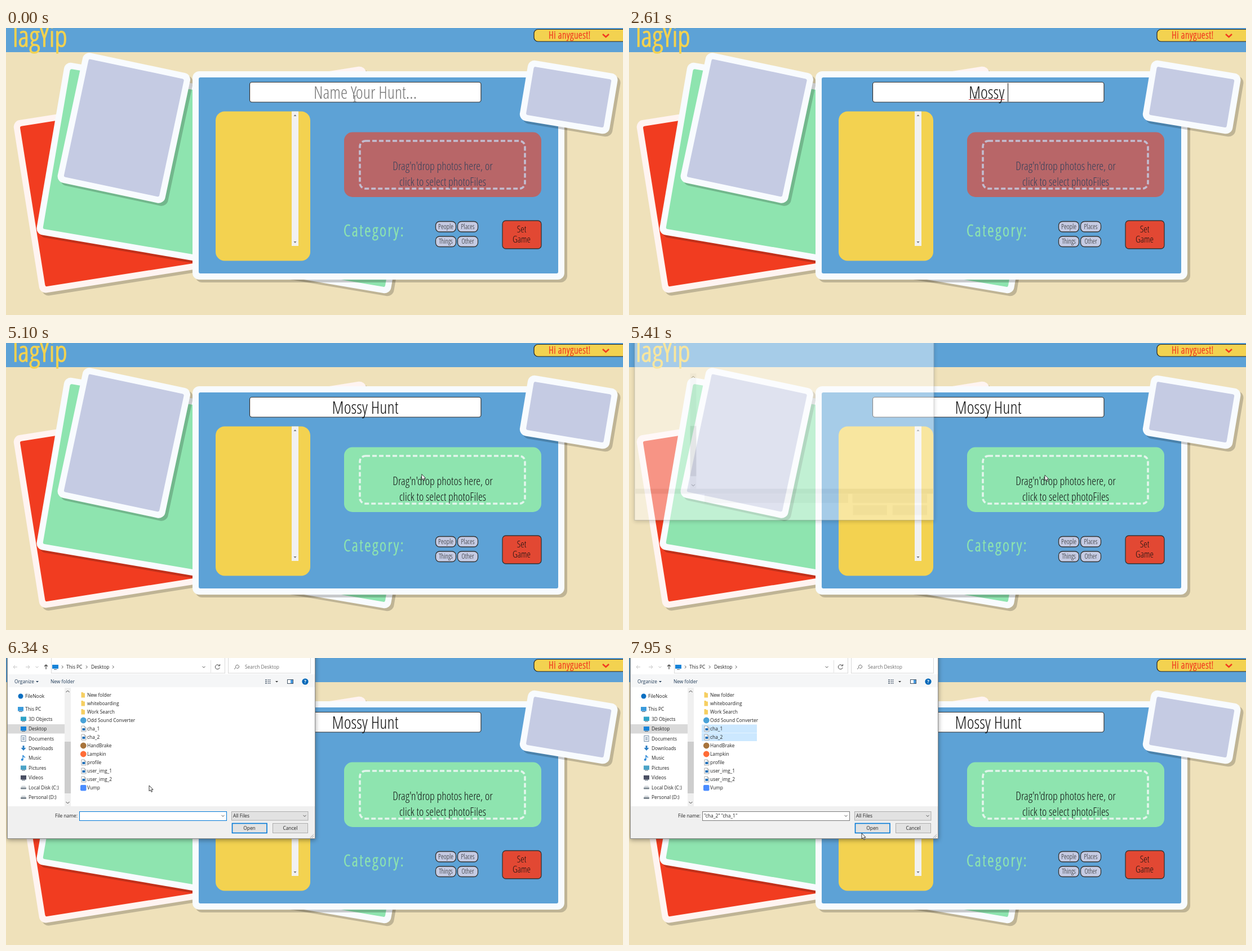
Recreate the animation shown at these times as an HTML page. Size 1095x511 px, loop 8 s.

```html
<!DOCTYPE html>
<html lang="en">
<head>
<meta charset="utf-8">
<title>Photo hunt setup</title>
<style>
  html, body { margin: 0; width: 100%; height: 100%; overflow: hidden; background: #efe1ba; }
  svg { display: block; width: 1095px; height: 511px; }
  text { white-space: pre; }
  .hand { font-family: "Open Sans Condensed Light", "Open Sans", "Noto Sans", sans-serif; font-stretch: 75%; font-weight: 300; }
  .ui { font-family: "Open Sans", "Noto Sans", sans-serif; font-size: 8.4px; }
</style>
</head>
<body>
<svg id="stage" viewBox="0 0 1095 511"></svg>
<script>
const LOOP = 8000, STEP = 77;
const BLUE = '#5da2d6', YELLOW = '#f3d250', GREEN = '#8ee4af', RED = '#f13c20', LILAC = '#c5cbe3';

const rect = (x, y, w, h, fill, rx = 0, more = '') =>
  `<rect x="${x}" y="${y}" width="${w}" height="${h}" rx="${rx}" fill="${fill}" ${more}/>`;
const path = (d, color, width = 1, more = '') =>
  `<path d="${d}" fill="none" stroke="${color}" stroke-width="${width}" ${more}/>`;
const shape = (d, fill) => `<path d="${d}" fill="${fill}"/>`;
const dot = (x, y, r, fill) => `<circle cx="${x}" cy="${y}" r="${r}" fill="${fill}"/>`;
const hand = (x, y, size, str, fill, more = '') =>
  `<text class="hand" x="${x}" y="${y}" font-size="${size}" fill="${fill}" ${more}>${str}</text>`;
const ui = (x, y, str, fill = '#222', more = '') =>
  `<text class="ui" x="${x}" y="${y + 3}" fill="${fill}" ${more}>${str}</text>`;
const middle = 'text-anchor="middle"';
const stroke = (color, width = 1) => `stroke="${color}" stroke-width="${width}"`;
// Thickens the light lettering a little
const marker = color => stroke(color, .5);

// White-framed card with an offset shadow, turned about its top left corner
function card(x, y, w, h, angle, fill, frame = '#f8fbfe') {
  const turn = shift => `transform="translate(${x + shift} ${y + shift}) rotate(${angle})"`;
  return rect(0, 0, w, h, '#0003', 12, turn(5)) +
    `<g ${turn(0)}>${rect(0, 0, w, h, frame, 12)}${rect(11, 11, w - 22, h - 22, fill, 3)}</g>`;
}

function page() {
  const tags = ['People', 'Places', 'Things', 'Other'].map((name, i) => {
    const x = 762.5 + i % 2 * 39, y = 344.5 + (i >> 1) * 26.5;
    return rect(x, y, 36, 18.5, LILAC, 7, stroke('#333', 1.3)) +
      hand(x + 18, y + 13, 12, name, '#222', middle);
  }).join('');
  return rect(0, 0, 1095, 511, '#efe1ba') + rect(0, 0, 1095, 43, BLUE) +
    hand(8, 33, 51, 'TagYip', YELLOW, stroke(YELLOW, 1.5)) +
    rect(937, 2.5, 165, 21.5, YELLOW, 7, stroke('#222', 1.2)) +
    hand(963, 19, 17.5, 'Hi anyguest!', RED, 'letter-spacing=".5" ' + marker(RED)) +
    path('M1059 11l5.500 5 5.500-5', RED, 2.6) +
    card(12, 166, 633, 311, -9, RED, '#fff4f1') +
    card(105, 60, 638, 311, 9.7, GREEN) +
    card(138.5, 42, 195, 236.5, 12, LILAC) +
    card(331, 77, 660, 371, 0, BLUE) +
    card(928, 56, 161.5, 109, 9.5, LILAC) +
    rect(432.5, 96.5, 410.5, 35.5, '#fff', 4, stroke('#333', 1.2)) +
    rect(372, 148.5, 168, 266, YELLOW, 16) + rect(507, 148.5, 12, 239.5, '#f1f1f1') +
    shape('M510.500 157l2.500-3 2.500 3zM510.500 380l2.500 3 2.500-3z', '#777') +
    `<g id="drop">${rect(600, 185.5, 350, 115.5, 'currentColor', 15)}
      ${rect(628, 201, 293, 85, 'none', 10, 'id="dashes" stroke-width="3.6" stroke-dasharray="8 4"')}
      <g id="dropText">${hand(775, 253, 20, "Drag'n'drop photos here, or", 'inherit', middle)}
      ${hand(775, 281, 20, 'click to select photoFiles', 'inherit', middle)}</g></g>` +
    hand(599, 371, 29, 'Category:', GREEN, 'letter-spacing="2.500" ' + stroke(GREEN, .8)) + tags +
    rect(881, 343, 69, 50, '#e24833', 6, stroke('#333', 1.3)) +
    hand(915, 364, 16.5, 'Set', '#111', middle) +
    hand(915, 382, 16.5, 'Game', '#111', middle) +
    hand(637.5, 126, 31, '', '#111', middle + ' id="title"') +
    path('', '#c33', 1, 'id="spell"') + rect(0, 98, 1, 33, '#111', 0, 'id="caret"');
}

const SIDE = [['FileNook', 68, '#0a6fc2'], ['This PC', 91, '#3b9bdc'], ['3D Objects', 108.5, '#2fa3c7'],
  ['Desktop', 126, '#1683d8'], ['Documents', 143.5, '#6d8aa5'], ['Downloads', 161, '#2c7fc4'],
  ['Music', 178, '#2c8ad8'], ['Pictures', 195.5, '#4ba3c7'], ['Videos', 213, '#4a4f63'],
  ['Local Disk (C:)', 230.5, '#7d8790'], ['Personal (D:)', 248, '#7d8790']];
const FILES = ['New folder', 'whiteboarding', 'Work Search', 'Odd Sound Converter', 'cha_1', 'cha_2',
  'HandBrake', 'Lampkin', 'profile', 'user_img_1', 'user_img_2', 'Vump'];
const APPS = { 3: '#4aa3d8', 6: '#a8743c', 7: '#ff6c37', 11: '#4a8cff' };

function sideIcon(i, x, y, color) {
  if (i === 0) return dot(x, y, 4.5, color);
  if (i === 4) return rect(x - 4, y - 5, 8, 10, '#fff', 0, stroke(color)) + path(`M${x - 2} ${y - 2}h4m-4 2h4m-4 2h4`, color);
  if (i === 5) return shape(`M${x - 1.5} ${y - 5}h3v4h3l-4.500 5-4.500-5h3z`, color);
  if (i === 6) return path(`M${x - 1} ${y + 3}v-8q1 3 4 4`, color, 1.4) + dot(x - 2.3, y + 3, 2, color);
  if (i > 8) return rect(x - 5, y, 10, 3, color, 1) + shape(`M${x - 3} ${y - 3}h6l2 3h-10z`, '#d4d9dd');
  return rect(x - 5, y - 4, 10, 7.5, color) + path(`M${x - 3} ${y + 4.5}h6`, '#567', 1);
}

const sheet = (y, inner) => shape(`M134 ${y - 5}h5l3 3v7h-8z`, '#fff') +
  path(`M134 ${y - 5}h5l3 3v7h-8zM139 ${y - 5}v3h3`, '#999', .8) + inner;

function fileRow(name, i) {
  const y = 66 + 15 * i;
  let icon;
  if (i < 3) icon = shape(`M133.500 ${y - 5}h3l1 1.500h2.500v8h-6.500z`, '#f6cf62');
  else {
    const loaded = !APPS[i] ? sheet(y, rect(135.5, y - 1, 5, 4, '#1f6fb8')) :
      i === 11 ? rect(132, y - 5, 10.5, 10.5, APPS[i], 2) : dot(137.3, y, 5.4, APPS[i]);
    icon = `<g class="blank">${sheet(y, '')}</g><g class="loaded">${loaded}</g>`;
  }
  return icon + ui(144, y, name);
}

function dialog() {
  const down = (x, y, c = '#555') => path(`M${x - 2.5} ${y - 1.2}l2.500 2.500 2.500-2.500`, c);
  const next = (x, y) => path(`M${x - 1} ${y - 2.5}l2.300 2.500-2.300 2.500`, '#555');
  const button = (x, y, w, h, edge, width) => rect(x, y, w, h, '#e2e2e2', 0, stroke(edge, width));
  const frame = rect(2.5, -120, 546, 441.5, '#fff', 0, stroke('#8a8a8a') + ' filter="url(#soft)"') +
    rect(3, 264, 545, 9, '#e6e6e6') + rect(130, 273, 262, 17, '#f0f0f0') + rect(400, 273, 136, 17, '#f0f0f0') +
    rect(401, 294, 62, 18, '#f0f0f0') + rect(473, 294, 63, 18, '#f0f0f0') +
    rect(104, 53, 11, 211, '#f0f0f0') + rect(104, 149, 11, 92, '#cdcdcd') +
    path('M106.500 61l3-3 3 3M106.500 256l3 3 3-3', '#444');
  const panels = rect(3, 29, 545, 23, '#f5f6f7') + rect(3, 264, 545, 57, '#f0f0f0') +
    rect(130.5, 273.5, 261, 16, '#fff', 0, 'id="field"') +
    button(400.5, 273.5, 135.5, 15.5, '#adadad') +
    button(401.5, 294.5, 61.5, 17, '#0078d7', 1.6) +
    button(473.5, 294.5, 62, 17, '#adadad');
  const nav = rect(80.5, -5, 308, 32, '#fff', 0, stroke('#d9d9d9')) + path('M363.500 4v22', '#e0e0e0') +
    rect(394.5, -5, 146, 32, '#fff', 0, stroke('#d9d9d9')) +
    path('M20 16h-7m3-3l-3 3 3 3M35 16h7m-3-3l3 3-3 3', '#c4c4c4') + down(55, 16, '#bbb') +
    path('M71 20v-8m-3 3l3-3 3 3', '#444', 1.2) + rect(82, 12, 11, 7, '#1683d8') + path('M85 20.500h5', '#567') +
    next(100, 16) + ui(107, 16, 'This PC') + next(143, 16) + ui(151, 16, 'Desktop') +
    `<g class="loaded">${next(190, 16)}</g>` + down(351, 16) +
    path('M378.500 13.500a4 4 0 1 0 .7 3.500M379.500 11v3h-3', '#444') +
    path('M405 20l3-3a3 3 0 1 1 1 1', '#666') + ui(424, 16, 'Search Desktop', '#6d6d6d') +
    ui(15, 42, 'Organize', '#1e3956') + shape('M53 41h5l-2.500 2.500z', '#1e3956') + ui(79, 42, 'New folder', '#1e3956') +
    path('M460 39h3m1.500 0h2m1 0h2m-9.500 3h3m1.500 0h2m1 0h2m-9.500 3h3m1.500 0h2m1 0h2', '#567', 1.6) +
    shape('M478 41h5l-2.500 2.500z', '#333') + rect(499.5, 38.5, 10, 7, '#fff', 0, stroke('#456')) +
    rect(505, 39, 4, 6, '#4a9be0') + dot(531, 42, 5.6, '#0067b8') +
    ui(531, 42, '?', '#fff', middle + ' font-weight="700"');
  const side = rect(3, 118, 101, 16.5, '#d9d9d9') + SIDE.map(([name, y, color], i) =>
    sideIcon(i, i < 2 ? 26 : 31, y, color) + ui(i < 2 ? 34 : 40, y, name)).join('');
  const rows = [0, 1].map(i => rect(129, 118.5 + 15 * i, 98, 14.5, 'none', 0, 'class="row"')).join('');
  const foot = ui(127, 281, 'File name:', '#222', 'text-anchor="end"') + ui(133, 281, '', '#222', 'id="fileName"') +
    path('M134 275.500v11', '#111', 1, 'id="fileCaret"') + down(385, 281) + ui(403, 281, 'All Files') + down(530, 281) +
    ui(432, 303, 'Open', '#222', middle) + ui(504.5, 303, 'Cancel', '#222', middle) +
    path('M540 320l6-6m-3 6l3-3', '#aaa', 1.2, 'stroke-dasharray="1.500 1"');
  return `<g id="dialog">${frame}<g id="content">${panels}${nav}${side}${rows}${FILES.map(fileRow).join('')}${foot}</g></g>`;
}

const arrow = '<path id="arrow" d="M0 0v10l2.300-2 1.700 3.600 1.700-.8-1.700-3.500h3.100z" fill="#fff" stroke="#222" stroke-width=".9"/>';
const beam = path('M-2.500-5.500q2.500 0 2.500 1v9q0 1-2.500 1M2.500-5.500q-2.500 0-2.500 1M0 4.500q0 1 2.500 1', '#444', .9, 'id="beam"');

const stage = document.getElementById('stage');
stage.innerHTML = `<defs><filter id="soft" x="-10%" y="-10%" width="120%" height="120%">
  <feDropShadow dx="0" dy="2" stdDeviation="4" flood-opacity=".4"/></filter></defs>` +
  page() + dialog() + `<g id="mouse">${arrow}${beam}</g>`;

const $ = id => document.getElementById(id);
const show = (el, on) => el.setAttribute('display', on ? 'inline' : 'none');
const set = (el, attrs) => { for (const k in attrs) el.setAttribute(k, attrs[k]); };

// start, number of steps, end point
const MOVES = [[210, 5, 616, 120], [4490, 1, 680, 158], [4567, 3, 737, 228], [4870, 5, 738, 235],
  [5480, 2, 654, 189], [5790, 8, 254, 227], [6410, 3, 160, 122], [6650, 1, 167, 126],
  [6950, 3, 206, 146], [7410, 8, 413, 312]];
const WORDS = 'Mossy Hunt';
const KEYS = [1360, 1680, 1990, 2060, 2230, 2610, 3010, 3240, 3390, 3540];
const CLICK = 420, BLUR = 4950, OPEN = 5410, LOADED = 5790, FIRST = 6800, SECOND = 7110;

function mouseAt(t) {
  let x = 619, y = 126;
  for (const [start, steps, toX, toY] of MOVES) {
    const k = Math.min(steps, Math.max(0, Math.floor((t - start) / STEP) + 1)) / steps;
    x += (toX - x) * k;
    y += (toY - y) * k;
  }
  return [x, y];
}

function drawTitle(t) {
  const title = $('title'), count = KEYS.filter(k => k <= t).length;
  const typing = t >= CLICK;
  title.textContent = typing ? WORDS.slice(0, count) : 'Name Your Hunt...';
  title.setAttribute('fill', typing ? '#111' : '#757575');
  const width = title.getComputedTextLength(), left = 637.5 - width / 2;
  const since = t - (count ? KEYS[count - 1] : CLICK);
  $('caret').setAttribute('x', left + width);
  show($('caret'), typing && t < BLUR && since % 960 < 480);
  show($('spell'), count > 5 && t < BLUR);
  if (count > 5) $('spell').setAttribute('d', `M${left} 127.500h${title.getSubStringLength(0, 5)}`);
}

function drawDialog(t, x, y) {
  show($('dialog'), t >= OPEN);
  const phase = Math.min(3, Math.max(0, Math.floor((t - OPEN) / 75)));
  const scale = [.973, .988, .996, 1][phase];
  set($('dialog'), { opacity: [.45, .75, .92, 1][phase],
    transform: `translate(275 100) scale(${scale}) translate(-275 -100)` });
  show($('content'), phase > 0);
  document.querySelectorAll('.loaded').forEach(el => show(el, t >= LOADED));
  document.querySelectorAll('.blank').forEach(el => show(el, t < LOADED));
  const picked = [t >= FIRST, t >= SECOND];
  document.querySelectorAll('.row').forEach((row, i) => {
    const over = x > 129 && x < 227 && y >= 118.5 + 15 * i && y < 133.5 + 15 * i;
    row.setAttribute('fill', picked[i] ? '#cce8ff' : over ? '#e5f3ff' : 'none');
  });
  $('fileName').textContent = picked[1] ? '"cha_2" "cha_1"' : picked[0] ? 'cha_1' : '';
  set($('field'), { stroke: picked[0] ? '#7a7a7a' : '#0078d7' });
  show($('fileCaret'), t < FIRST && (t - 5480) % 960 < 480);
}

function draw(t) {
  const [x, y] = mouseAt(t), hover = t >= 4567;
  drawTitle(t);
  $('drop').setAttribute('color', hover ? GREEN : '#b86668');
  $('dashes').setAttribute('stroke', hover ? '#e3f5ec' : '#c3bdd0');
  $('dropText').setAttribute('style', `fill:${hover ? '#111' : '#33405a'}`);
  drawDialog(t, x, y);
  $('mouse').setAttribute('transform', `translate(${x} ${y})`);
  show($('arrow'), t >= 4490);
  show($('beam'), t < 4490);
}

function tick(now) {
  draw(now % LOOP);
  requestAnimationFrame(tick);
}
requestAnimationFrame(tick);
</script>
</body>
</html>
```
